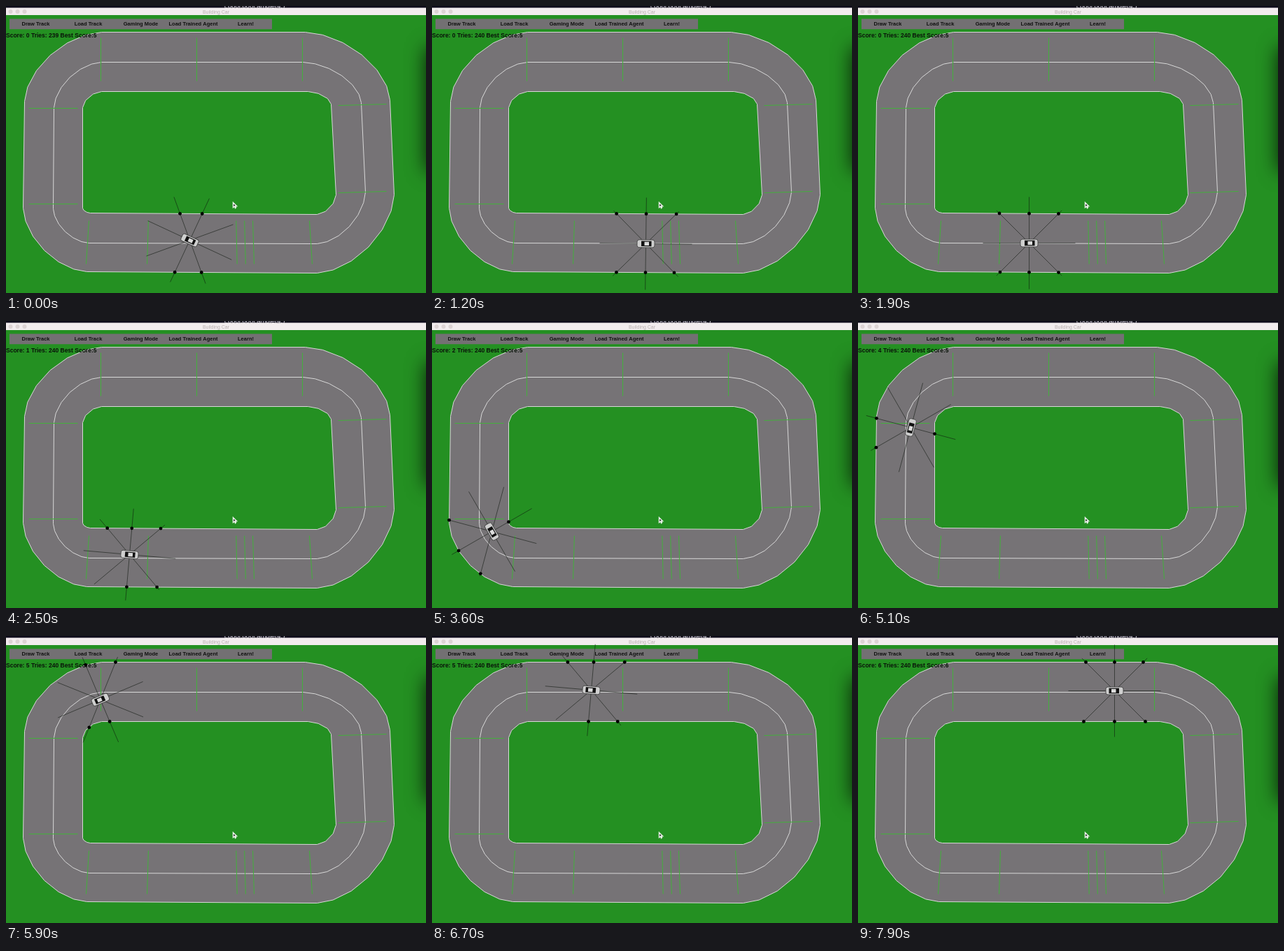
Animation, 600 px wide and 411 px high, one loop 8 s. Source, as an HTML page with a canvas:

```html
<!DOCTYPE html>
<html>
<head>
<meta charset="utf-8">
<title>Building Car</title>
<style>
html, body { margin: 0; width: 100%; height: 100%; overflow: hidden; }
canvas { display: block; }
</style>
</head>
<body>
<canvas id="stage" width="600" height="411"></canvas>
<script>
const g = document.getElementById('stage').getContext('2d');
const LOOP = 8000, STEP = 100, RESET = 1000;
const SPEED = 0.113, RAY = 66, RAD = Math.PI / 180;
const FONT = '"Liberation Sans", Arial, sans-serif';
const GRASS = '#249022', ROAD = '#767376';

// Closed loop through four rounded corners. Each corner runs between two
// tangent points along a slightly flattened ellipse, in straight pieces.
function roundedLoop(tangents, pieces = 6) {
  const loop = [];
  for (let i = 0; i < 8; i += 2) {
    const [a, b] = [tangents[i], tangents[i + 1]];
    const [cx, cy] = i % 4 ? [a[0], b[1]] : [b[0], a[1]];
    for (let k = 0; k <= pieces; k++) {
      const turn = k / pieces * Math.PI / 2;
      const u = Math.cos(turn) ** 1.17, v = Math.sin(turn) ** 1.17;
      loop.push([cx + (a[0] - cx) * u + (b[0] - cx) * v, cy + (a[1] - cy) * u + (b[1] - cy) * v]);
    }
  }
  return loop;
}

const outer = roundedLoop([[26, 136], [136, 37], [427, 37], [548, 134], [554, 270], [444, 382], [115, 380], [24, 289]]);
const middle = roundedLoop([[68, 145], [136, 80], [424, 80], [507, 138], [513, 266], [444, 340], [118, 339], [67, 290]]);
const inner = roundedLoop([[109, 145], [136, 122], [431, 122], [464, 140], [471, 270], [444, 298], [120, 296], [109, 289]], 3);

// The car drives a smooth curve through these: time, x, y, heading in degrees
const keys = [
  [RESET, 325, 340, 180], [1900, 244, 339, 180], [2500, 176, 334, 185], [3600, 85, 301, 240],
  [5100, 75, 152, 285], [6700, 227, 77, 5], [7900, 366, 78, 0]
];
const scoreTimes = [2200, 3000, 3700, 5100, 5800, 7000];

function poseAt(t) {
  if (t < RESET) return [262, 335, 205 * RAD];
  const i = Math.max(1, keys.findIndex(k => k[0] >= t));
  const [t0, x0, y0, h0] = keys[i - 1], [t1, x1, y1, h1] = keys[i];
  const k = (t - t0) / (t1 - t0), reach = SPEED * (t1 - t0);
  // cubic Hermite curve: value and slope
  const curve = (p, q, m, n) => [
    p + k * m + k * k * (3 * (q - p) - 2 * m - n) + k ** 3 * (2 * (p - q) + m + n),
    m + 2 * k * (3 * (q - p) - 2 * m - n) + 3 * k * k * (2 * (p - q) + m + n)
  ];
  const [x, dx] = curve(x0, x1, reach * Math.cos(h0 * RAD), reach * Math.cos(h1 * RAD));
  const [y, dy] = curve(y0, y1, reach * Math.sin(h0 * RAD), reach * Math.sin(h1 * RAD));
  return [x, y, Math.atan2(dy, dx)];
}

function trace(list) {
  g.beginPath();
  list.forEach(([x, y]) => g.lineTo(x + .5, y + .5));
}

function line(x0, y0, x1, y1) {
  trace([[x0, y0], [x1, y1]]);
  g.stroke();
}

function strokeLoop(list, fill) {
  trace(list);
  g.closePath();
  if (fill) {
    g.fillStyle = fill;
    g.fill();
  }
  g.stroke();
}

function rect(color, x, y, w, h) {
  g.fillStyle = color;
  g.fillRect(x, y, w, h);
}

function disc(color, x, y, r) {
  g.fillStyle = color;
  g.beginPath();
  g.arc(x, y, r, 0, 7);
  g.fill();
}

function text(s, x, y, size, color, align = 'center', weight = 'bold') {
  g.font = `${weight} ${size}px ${FONT}`;
  g.textAlign = align;
  g.fillStyle = color;
  g.fillText(s, x, y);
}

function drawTrack() {
  rect(GRASS, 0, 0, 600, 411);
  g.save();
  g.shadowColor = 'rgba(0,0,0,.8)';
  g.shadowBlur = 28;
  rect('#000', 600, 60, 40, 176);
  g.restore();

  g.lineWidth = 1;
  g.strokeStyle = '#d8d8d8';
  strokeLoop(outer, ROAD);
  strokeLoop(inner, GRASS);
  strokeLoop(middle);

  g.strokeStyle = '#43b03c';
  for (const x of [135, 272, 423]) line(x, 45, x, 107);
  for (const x of [116, 202, 329, 341, 353, 435]) {
    const lean = (x - 276) / 80;
    line(x - lean, 307, x + lean, 369);
  }
  for (const y of [146, 283]) line(32, y, 102, y);
  for (const y of [141, 266]) line(474, y + 1, 543, y - 1);
}

function drawWindow(t) {
  rect('#100d1c', 0, 0, 600, 3);
  text('t.pool.pool.ample(4.)', 355, 2.5, 9.5, '#e0dee6', 'center', 'normal');
  rect('#f2ecee', 0, 2.5, 600, 10.5);
  for (const x of [6.5, 16.5, 26.5]) disc('#dcd3d4', x, 8, 3);
  text('Building Car', 300, 10.5, 7, '#b8afb0', 'center', 'normal');

  rect('#737073', 5, 18.4, 375, 14.8);
  ['Draw Track', 'Load Track', 'Gaming Mode', 'Load Trained Agent', 'Learn!'].forEach((s, i) =>
    text(s, 42.5 + 75 * i, 28, 7.5, '#111'));
  const score = scoreTimes.filter(s => t >= s).length;
  text(`Score: ${score} Tries: ${t < RESET ? 239 : 240} Best Score:${Math.max(5, score)}`,
    0, 45.3, 8.5, '#0a140a', 'left');
}

// Nearest distance along a ray to either wall, or Infinity
function hitDistance(x, y, dx, dy) {
  let best = Infinity;
  for (const wall of [outer, inner]) wall.forEach(([ax, ay], i) => {
    const [bx, by] = wall[(i + 1) % wall.length];
    const ex = bx - ax, ey = by - ay, det = dx * ey - dy * ex;
    const s = ((ax - x) * ey - (ay - y) * ex) / det;
    const u = ((ax - x) * dy - (ay - y) * dx) / det;
    if (s > 0 && u >= 0 && u <= 1) best = Math.min(best, s);
  });
  return best;
}

function drawRays(x, y, heading) {
  g.strokeStyle = 'rgba(14,20,14,.62)';
  g.lineWidth = .9;
  for (let i = 0; i < 8; i++) {
    const a = heading + i * Math.PI / 4, dx = Math.cos(a), dy = Math.sin(a);
    line(x, y, x + dx * RAY, y + dy * RAY);
    const d = hitDistance(x, y, dx, dy);
    if (d <= RAY) disc('#000', x + dx * d + .5, y + dy * d + .5, 2.4);
  }
}

function drawCar(x, y, heading) {
  g.save();
  g.translate(x + .5, y + .5);
  g.rotate(heading);
  g.fillStyle = '#cfcfcf';
  g.strokeStyle = '#454545';
  g.beginPath();
  g.roundRect(-12.5, -5.5, 25, 11, 3);
  g.fill();
  g.stroke();
  // dark glass around a light roof
  rect('#111', -8, -3.8, 14.5, 7.6);
  rect('#dcdcdc', -4.5, -2.6, 6.5, 5.2);
  g.restore();
}

function drawCursor() {
  g.strokeStyle = '#e6efe6';
  g.lineWidth = 1.5;
  strokeLoop([[324, 281], [324, 288], [326, 286.5], [327, 289], [328, 288], [327, 286], [329, 286]], '#101010');
}

function frame(now) {
  const t = Math.floor(now % LOOP / STEP) * STEP;
  const pose = poseAt(t);
  drawTrack();
  drawWindow(t);
  drawRays(...pose);
  drawCar(...pose);
  drawCursor();
  requestAnimationFrame(frame);
}
requestAnimationFrame(frame);
</script>
</body>
</html>
```
